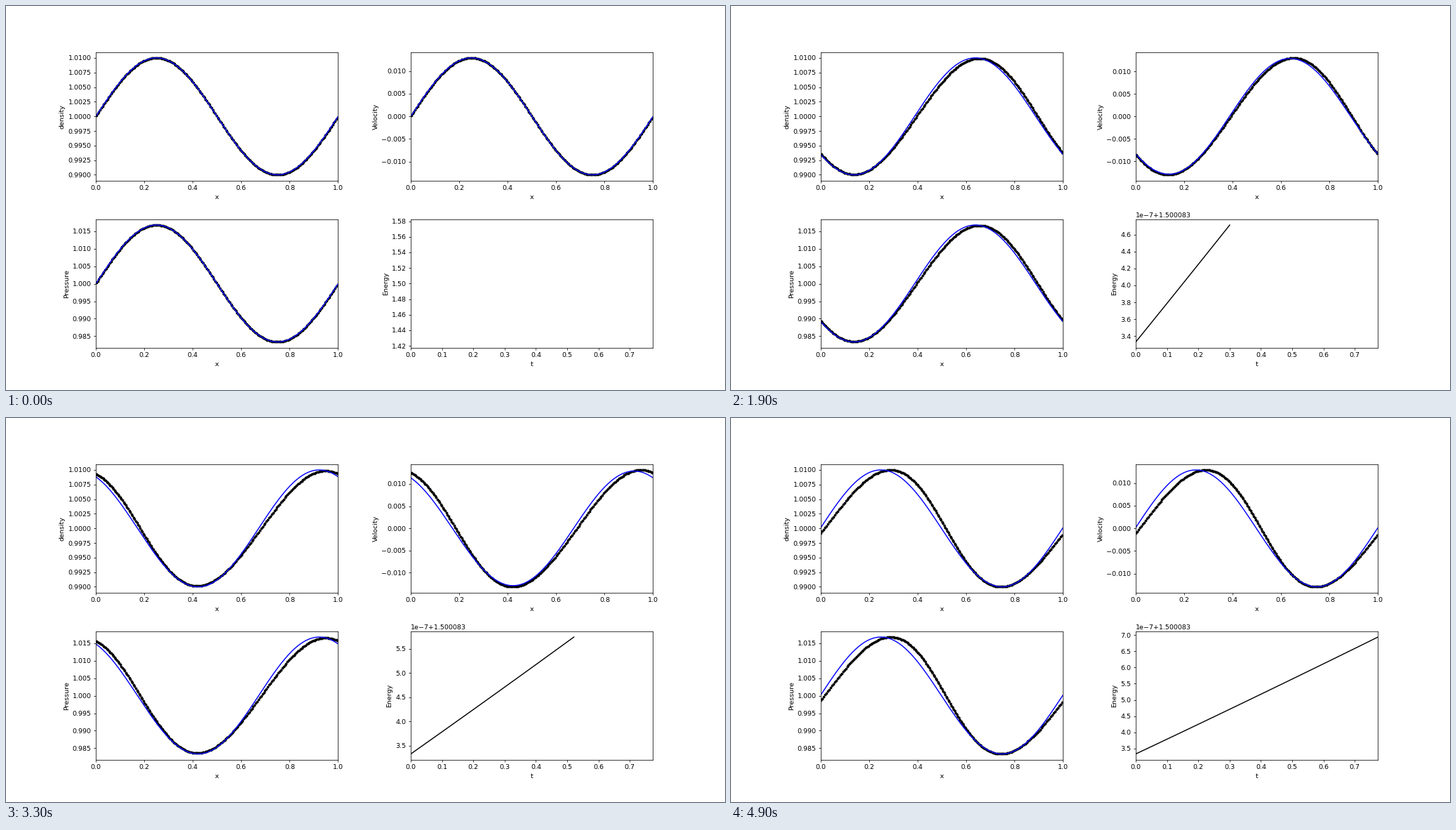
A matplotlib script that plays this animation: 1025x547 px, repeating every 5000 ms.

```python
import numpy as np
import matplotlib.pyplot as plt
from matplotlib.animation import FuncAnimation

WIDTH, HEIGHT = 1025, 547
DPI = WIDTH / 15         # a 15 x 8 inch figure
FRAMES, INTERVAL = 50, 100
GAMMA = 5 / 3
CS = np.sqrt(GAMMA)
PERIOD = 1 / CS
AMP = 0.01
DT = 0.0158              # time between frames
EXACT_RATE = 0.02036     # wave cycles per frame, linear theory
SIM_RATE = 0.02073       # slightly faster in the particle run
EPS_RHO, EPS_V = 0.018, 0.024
STEEPEN = 0.022          # crest displacement at the end of the run
N = 200

plt.rcParams["font.family"] = "DejaVu Sans"
# The tiny margin guards against the pixel size being truncated.
fig, axes = plt.subplots(
    2, 2, figsize=((WIDTH + 1e-6) / DPI, (HEIGHT + 1e-6) / DPI), dpi=DPI)
# Right edge just under 0.9, so the spines snap to the inner pixel.
fig.subplots_adjust(left=0.125, right=0.89995, bottom=0.11, top=0.88,
                    wspace=0.3, hspace=0.3)
ax_rho, ax_v, ax_p, ax_e = axes.flat


def wave_panel(ax, label):
    dots, = ax.plot([], [], "k.")
    line, = ax.plot([], [], "b-")
    ax.set(xlabel="x", ylabel=label, xlim=(0, 1))
    return ax, dots, line


panels = [wave_panel(ax_rho, "density"),
          wave_panel(ax_v, "Velocity"),
          wave_panel(ax_p, "Pressure")]
energy_line, = ax_e.plot([], [], "k-")
ax_e.set(xlabel="t", ylabel="Energy", xlim=(0, PERIOD))

x_line = np.linspace(0, 1, 401)
x_cell = (np.arange(N) + 0.5) / N


def fields(rho_wave, v_wave):
    rho = 1 + AMP * rho_wave
    return rho, AMP * CS * v_wave, rho ** GAMMA


def exact(i):
    s = np.sin(2 * np.pi * (x_line - EXACT_RATE * i))
    return fields(s, s)


def simulated(i):
    """Right-moving wave with a weak reflection, steepening in time."""
    k = 2 * np.pi * x_cell
    tau = 2 * np.pi * SIM_RATE * i
    a, b = np.sin(k) * np.cos(tau), np.cos(k) * np.sin(tau)
    shift = STEEPEN * i / (FRAMES - 1) * np.sin(k - tau)
    return ((x_cell + shift) % 1,
            fields(a - (1 - EPS_RHO) * b, a - (1 + EPS_V) * b))


def energy(t):
    return 1.5 + 1 / 12000 + 4.55e-7 * t + 1.4e-8 * t ** 2


def rescale(ax):
    ax.relim()
    ax.autoscale_view(scalex=False)


def update(i):
    x_dots, sim = simulated(i)
    for (ax, dots, line), y_dots, y_line in zip(panels, sim, exact(i)):
        dots.set_data(x_dots, y_dots)
        line.set_data(x_line, y_line)
        rescale(ax)
    t = DT * np.arange(i + 1)
    energy_line.set_data(t, energy(t))
    rescale(ax_e)
    return []


anim = FuncAnimation(fig, update, frames=FRAMES, init_func=lambda: update(0),
                     interval=INTERVAL, repeat=True, repeat_delay=0)
plt.show()
```
